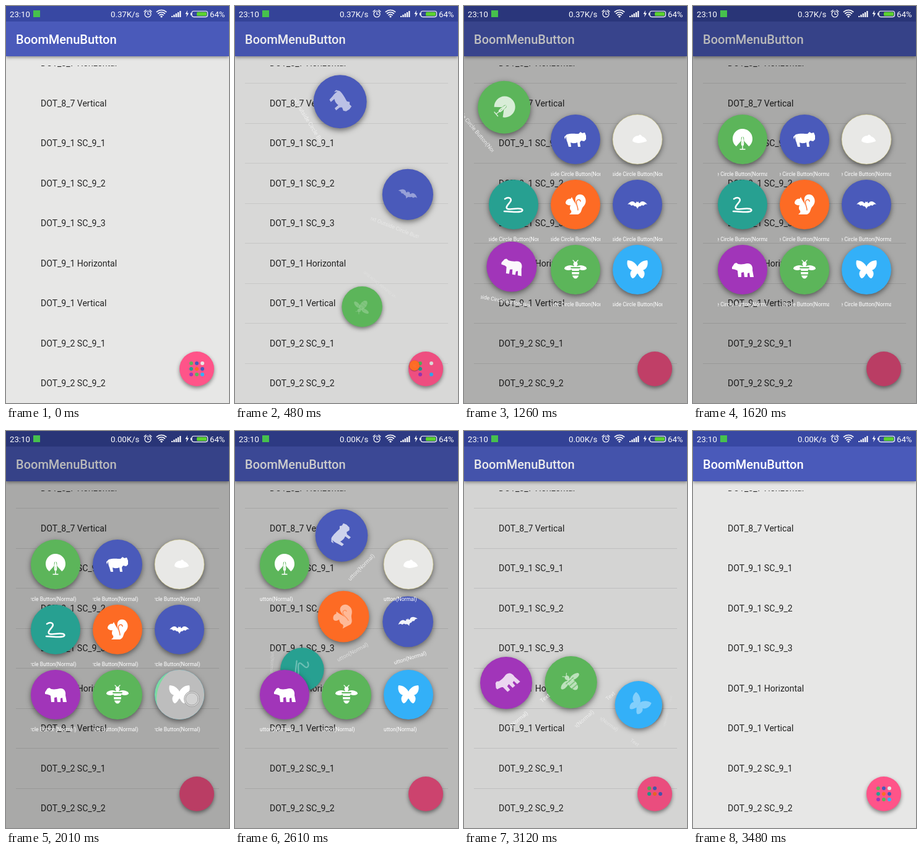
These frames come from a looping animation (360 by 640 pixels, 3540 ms). An HTML page with a canvas:

```html
<!DOCTYPE html>
<html lang="en">
<head>
<meta charset="utf-8">
<title>Boom menu</title>
<style>
html, body { margin: 0; width: 100%; height: 100%; overflow: hidden; background: #e7e7e6; }
canvas { display: block; width: 360px; height: 640px; }
</style>
</head>
<body>
<canvas id="stage" width="360" height="640"></canvas>
<script>
const ctx = document.getElementById('stage').getContext('2d');
const LOOP = 3540, STEP = 30, TAU = Math.PI * 2;
const DURATION = 450, STAGGER = 90, SHOW_AT = 197, HIDE_AT = 2306;
const FADE = DURATION + STAGGER * 8;
const MAX_DIM = 0.27;
const FONT = 'Roboto, "Noto Sans", sans-serif';
const LABEL = 'Text Outside Circle Button(Normal)';
const GREEN = '#5cb55a', BLUE = '#4a5aba';

const clamp = v => Math.max(0, Math.min(1, v));

function bezier(x1, y1, x2, y2) {
  const curve = (a, b, s) => 3 * (1 - s) * (1 - s) * s * a + 3 * (1 - s) * s * s * b + s * s * s;
  return x => {
    if (x <= 0 || x >= 1) return clamp(x);
    let lo = 0, hi = 1;
    for (let i = 0; i < 24; i++) {
      const mid = (lo + hi) / 2;
      if (curve(x1, x2, mid) < x) lo = mid; else hi = mid;
    }
    return curve(y1, y2, lo);
  };
}
const easeOut = bezier(0.175, 0.885, 0.32, 1.26);
const easeIn = bezier(0.6, -0.2, 0.735, 0.045);

function disc(x, y, r, color) {
  ctx.fillStyle = color;
  ctx.beginPath();
  ctx.arc(x, y, r, 0, TAU);
  ctx.fill();
}

function oval(x, y, rx, ry, turn, color) {
  ctx.fillStyle = color;
  ctx.beginPath();
  ctx.ellipse(x, y, rx, ry, turn, 0, TAU);
  ctx.fill();
}

function shadow(blur, dy, alpha) {
  ctx.shadowColor = `rgba(0,0,0,${alpha})`;
  ctx.shadowBlur = blur;
  ctx.shadowOffsetY = dy;
}

function text(str, x, y, size, color, weight = 400) {
  ctx.font = `${weight} ${size}px ${FONT}`;
  ctx.fillStyle = color;
  ctx.fillText(str, x, y);
}

function strokePath(d, width, color = '#fff') {
  ctx.lineWidth = width;
  ctx.strokeStyle = color;
  ctx.stroke(new Path2D(d));
}

const silhouette = d => {
  const path = new Path2D(d);
  return () => { ctx.fillStyle = '#fff'; ctx.fill(path); };
};

function mirrored(draw) {
  for (const side of [1, -1]) {
    ctx.save();
    ctx.scale(side, 1);
    draw();
    ctx.restore();
  }
}

function peacock(color) {
  ctx.fillStyle = '#fff';
  ctx.beginPath();
  ctx.moveTo(0, 0);
  ctx.arc(0, -1, 16, TAU * 0.36, TAU * 1.14);
  ctx.fill();
  strokePath('M0-2V10', 4.5, color);
  strokePath('M0-3C-1 3-2 5-1 9H1C2 5 1 3 0-3', 2);
  strokePath('M0 9V16M-4 16H4', 1.4);
}

function bee(color) {
  mirrored(() => {
    oval(10, -3, 8, 3.8, 0.15, '#fff');
    strokePath('M1-12L4-15', 1.2);
  });
  disc(0, -9, 3.4, '#fff');
  oval(0, 4, 6, 10.5, 0, '#fff');
  strokePath('M-7-3H7M-7 3H7M-7 8.5H7', 1.8, color);
}

const wing = silhouette('M0-5C3-11 9-15 16-15C18-8 15-1 9 1C13 4 12 11 8 14C4 14 2 8 0 6Z');
const squirrelBody = silhouette('M-16-3C-15-8-11-10-8-9L-6-12L-4-8C-2-4 2 0 2 6C1-1-1-6 0-11C2-17 10-18 14-13C19-6 16 0 12 4C9 8 10 14 4 16H-10C-8 14-6 13-7 10C-10 8-9 3-8 1C-11 2-16 0-16-3Z');

function squirrel(color) {
  squirrelBody();
  strokePath('M4 9C4 3 0-1 2-6C4-9 8-8 8-5', 1.3, color);
}

const pig = silhouette('M-14-8C-8-10 0-9 5-9L8-12L11-10L15-11L17-6V0L14 3L9 2L7 5L8 12H4L3 5C-2 7-6 6-8 5L-7 12H-11L-13 5C-15 1-15-3-15-5L-17 0L-18-4Z');
const mouse = silhouette('M-8 3C-8-3-3-6 2-6C3-8 6-8 7-5C11-4 15 0 15 3C10 5 4 6 1 6L-4 5Z');
const bat = silhouette('M-16 0C-12-5-8-6-5-4C-4-2-3-2-2-3L-1.5-5L0-3.5L1.5-5L2-3C3-2 4-2 5-4C8-6 12-5 16 0C13-1 11 0 10 2C8 1 6 1 5 3C3 2 1 4 0 7C-1 4-3 2-5 3C-6 1-8 1-10 2C-11 0-13-1-16 0Z');
const bear = silhouette('M-17-4L-13-10L-10-11L-7-9C-2-8 3-9 7-10C14-11 17-5 16 1L18 12H12L11 5L8 6V12H3L2 4L-2 5V12H-7L-8 2C-10 0-12 0-17-1Z');
const snake = () => strokePath('M-14-9C-8-13-2-10-5-5C-8 0-14 4-10 7C-4 9 4 5 12 7C17 9 14 12 6 12C-2 12-10 11-15 11', 2.5);
const butterfly = () => mirrored(wing);

// show / hide: turn in the launch and return queues
const buttons = [
  { icon: peacock, color: GREEN, show: 8, hide: 4 },
  { icon: pig, color: BLUE, show: 0, hide: 2 },
  { icon: mouse, color: '#e8e8e6', rim: 'rgba(216,204,102,.6)', show: 6, hide: 5 },
  { icon: snake, color: '#27a091', show: 5, hide: 0 },
  { icon: squirrel, color: '#fd6b24', show: 3, hide: 1 },
  { icon: bat, color: BLUE, show: 1, hide: 3 },
  { icon: bear, color: '#a135b9', show: 7, hide: 8 },
  { icon: bee, color: GREEN, show: 2, hide: 7 },
  { icon: butterfly, color: '#33b0f8', show: 4, hide: 6, pressable: true },
].map((b, i) => {
  const col = i % 3, row = Math.floor(i / 3);
  return { ...b, dotX: 299 + col * 9, dotY: 576 + row * 9, x: 80 + col * 100, y: 215 + row * 105 };
});

function pose(b, t) {
  const shown = (t - SHOW_AT - b.show * STAGGER) / DURATION;
  const hidden = (t - HIDE_AT - b.hide * STAGGER) / DURATION;
  if (shown <= 0 || hidden >= 1) return null;
  const hiding = hidden > 0;
  const p = hiding ? 1 - easeIn(hidden) : easeOut(shown);
  return {
    x: b.dotX + (b.x - b.dotX) * p,
    y: b.dotY + (b.y - b.dotY) * p * p,
    scale: 0.075 + 0.925 * p,
    turn: (hiding ? 1 - p : p) * 2 * TAU,
    alpha: hiding ? 1 - hidden : clamp(shown),
  };
}

function drawPress(t) {
  const grow = (t - 1920) / 95, fade = 1 - clamp((t - 2070) / 150);
  if (grow <= 0 || fade <= 0) return;
  ctx.save();
  ctx.beginPath();
  ctx.arc(0, 0, 40, 0, TAU);
  ctx.clip();
  ctx.globalAlpha = fade;
  disc(0, 0, 40, '#7ddba0');
  disc(20, 7, 60 * Math.min(1.2, grow), '#bdbdbd');
  ctx.restore();
}

function drawTouch(t) {
  if (t < 1920 || t >= 2070) return;
  disc(300, 432, 12.5, 'rgba(215,215,215,.85)');
  ctx.strokeStyle = '#999';
  ctx.lineWidth = 0.8;
  ctx.stroke();
  ctx.beginPath();
  ctx.arc(300, 432, 10, 0, TAU);
  ctx.stroke();
}

function drawLabel(t) {
  ctx.beginPath();
  ctx.rect(-40, 48, 80, 15);
  ctx.clip();
  const scroll = Math.max(0, (t - 261) / 30);
  text(LABEL, -40 - scroll, 58.5, 8.5, '#fff');
  ctx.fillText(LABEL, -40 - scroll + ctx.measureText(LABEL).width + 27, 58.5);
}

function drawButton(b, t) {
  const s = pose(b, t);
  if (!s) return;
  ctx.save();
  ctx.translate(s.x, s.y);
  ctx.scale(s.scale, s.scale);
  ctx.save();
  shadow(9 * s.scale, 3 * s.scale, 0.5);
  disc(0, 0, 40, b.color);
  ctx.restore();
  if (b.rim) {
    ctx.strokeStyle = b.rim;
    ctx.lineWidth = 0.7;
    ctx.stroke();
  }
  if (b.pressable) drawPress(t);
  ctx.rotate(s.turn);
  ctx.globalAlpha = s.alpha;
  b.icon(b.color);
  drawLabel(t);
  ctx.restore();
}

function drawList(dim) {
  ctx.fillStyle = '#e7e7e6';
  ctx.fillRect(0, 0, 360, 640);
  ctx.save();
  ctx.beginPath();
  ctx.rect(0, 96, 360, 544);
  ctx.clip();
  const rows = ['8_7 Horizontal', '8_7 Vertical', '9_1 SC_9_1', '9_1 SC_9_2', '9_1 SC_9_3',
    '9_1 Horizontal', '9_1 Vertical', '9_2 SC_9_1', '9_2 SC_9_2'];
  rows.forEach((row, i) => {
    const mid = 92.5 + i * 64.5;
    text('DOT_' + row, 56, Math.round(mid + 4.9), 14, '#222');
    ctx.fillStyle = `rgba(0,0,0,${0.1 * clamp(dim * 12)})`;
    ctx.fillRect(16, Math.round(mid + 31.5), 328, 1);
  });
  ctx.restore();
}

function drawBars() {
  ctx.save();
  shadow(5, 2, 0.4);
  ctx.fillStyle = '#4a5aba';
  ctx.fillRect(0, 25, 360, 56);
  ctx.restore();
  ctx.fillStyle = '#3848a3';
  ctx.fillRect(0, 0, 360, 25);
  text('BoomMenuButton', 16, 61, 20, '#fff', 500);
}

function drawFab(t) {
  ctx.save();
  shadow(6, 3, 0.45);
  disc(308, 585, 28, '#ff5489');
  ctx.restore();
  for (const b of buttons) if (!pose(b, t)) disc(b.dotX, b.dotY, 3, b.color);
}

function drawStatus(t) {
  text('23:10', 6, 17.5, 13.2, '#fff');
  text(t < 1830 ? '0.37K/s' : '0.00K/s', 169, 17.5, 13.2, '#fff');
  text('64%', 329, 17.5, 13.2, '#fff');
  ctx.fillStyle = '#46c14d';
  ctx.fillRect(44, 7, 11, 11);

  ctx.strokeStyle = '#fff';
  ctx.lineWidth = 1.2;
  ctx.beginPath();
  ctx.arc(229, 13, 5, 0, TAU);
  ctx.stroke();
  strokePath('M229 10V13.5H231.5M223 9L226 6.5M235 9L232 6.5', 1.2);

  for (const r of [4.5, 8, 11.5]) {
    ctx.lineWidth = 1.7;
    ctx.beginPath();
    ctx.arc(251, 18, r, TAU * 0.635, TAU * 0.865);
    ctx.stroke();
  }
  disc(251, 17, 1.6, '#fff');
  for (let i = 0; i < 5; i++) ctx.fillRect(267 + i * 3.3, 16 - i * 2, 2.2, 2 + i * 2);
  ctx.fill(new Path2D('M293 7L289.5 13H292L291 18L295 11.5H292.4Z'));

  ctx.lineWidth = 1.1;
  ctx.beginPath();
  ctx.roundRect(300, 8.2, 25.5, 9.4, 3);
  ctx.stroke();
  ctx.fillRect(298, 11, 1.6, 4);
  ctx.fillStyle = '#5bd02f';
  ctx.beginPath();
  ctx.roundRect(308, 9.8, 16, 6.2, 1.5);
  ctx.fill();
}

function draw(t) {
  const dim = MAX_DIM * (clamp((t - SHOW_AT) / FADE) - clamp((t - HIDE_AT) / FADE));
  drawList(dim);
  drawBars();
  drawFab(t);
  ctx.fillStyle = `rgba(0,0,0,${dim})`;
  ctx.fillRect(0, 0, 360, 640);
  drawStatus(t);
  const depth = t < HIDE_AT ? (a, b) => b.show - a.show : (a, b) => a.hide - b.hide;
  for (const b of [...buttons].sort(depth)) drawButton(b, t);
  drawTouch(t);
}

ctx.lineCap = 'round';
const start = performance.now();
function tick() {
  const t = (performance.now() - start) % LOOP;
  draw(Math.min(3480, Math.floor(t / STEP) * STEP));
  requestAnimationFrame(tick);
}
tick();
</script>
</body>
</html>
```
